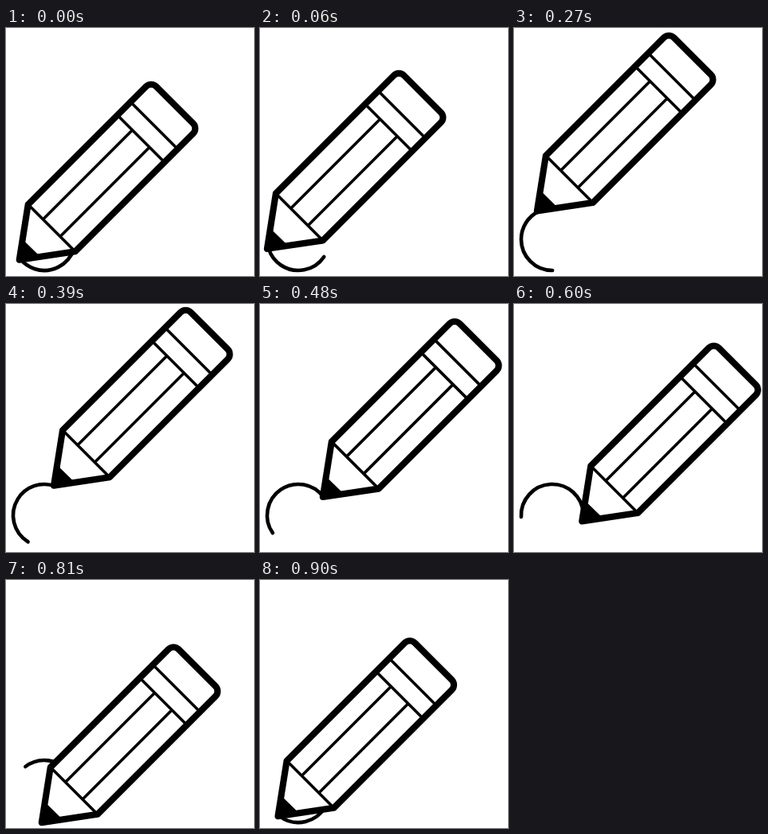
Write an HTML page that moves like this. It is 311 by 311 pixels and loops after 930 ms.

```html
<!DOCTYPE html>
<html lang="en">
<head>
<meta charset="utf-8">
<title>Pencil drawing a circle</title>
<style>
  html, body { margin: 0; width: 100%; height: 100%; overflow: hidden; background: #fff; }
  svg { display: block; width: 100%; height: 100%; }
  svg * { stroke: #000; stroke-linecap: round; stroke-linejoin: round; }
  #trace { fill: none; stroke-width: 4.6; }
  #body { fill: #fff; stroke-width: 8.1; }
  #lines { fill: none; stroke-width: 3.6; }
  #lead { stroke-width: 1; }
</style>
</head>
<body>
<svg viewBox="0 0 311 311">
  <circle id="trace" cx="48" cy="265" r="39" pathLength="360"/>
  <g id="pencil">
    <path id="body"/>
    <path id="lines"/>
    <path id="lead" d="M16.7 290.7L20.7 265.5L41.7 286Z"/>
  </g>
</svg>
<script>
const LOOP = 930, STEP = 30, RADIUS = 39.5;
const HEAD = 139;                      // pencil angle at time 0, degrees
const TAIL = 18.4, TAIL_SPEED = 0.2645; // start of the stroke, degrees per ms
const $ = id => document.getElementById(id);

// Pencil axes: a runs along the shaft, b across it.
const pt = (a, b) => `${(b + a) / 2} ${(b - a) / 2}`;
const line = (a1, b1, a2, b2) => `M${pt(a1, b1)}L${pt(a2, b2)}`;

const left = 249, right = 367, neck = -193.6, end = 115;
const r = 9, cut = r * Math.SQRT2;

$('body').setAttribute('d',
  `M16.7 290.7L${pt(neck, left)}L${pt(end - cut, left)}` +
  `A${r} ${r} 0 0 1 ${pt(end, left + cut)}L${pt(end, right - cut)}` +
  `A${r} ${r} 0 0 1 ${pt(end - cut, right)}L${pt(neck, right)}Z`);

$('lines').setAttribute('d',
  line(neck, left, neck, right) +
  line(30.4, left, 30.4, right) +
  line(63.4, left, 63.4, right) +
  line(neck, 286.5, 30.4, 286.5) +
  line(neck, 329.5, 30.4, 329.5));

const polar = deg => {
  const a = deg * Math.PI / 180;
  return [RADIUS * Math.cos(a), RADIUS * Math.sin(a)];
};
const [x0, y0] = polar(HEAD);

function draw(now) {
  const t = Math.floor(now % LOOP / STEP) * STEP;
  const head = HEAD + 360 * t / LOOP;
  const tail = TAIL + TAIL_SPEED * t;
  const [x, y] = polar(head);
  const span = head - tail;
  $('pencil').setAttribute('transform', `translate(${x - x0} ${y - y0})`);
  $('trace').setAttribute('transform', `rotate(${tail} 48 265)`);
  $('trace').setAttribute('stroke-dasharray', `${span} ${360 - span}`);
}

const start = performance.now();
function tick() {
  draw(performance.now() - start);
  requestAnimationFrame(tick);
}
tick();
</script>
</body>
</html>
```
